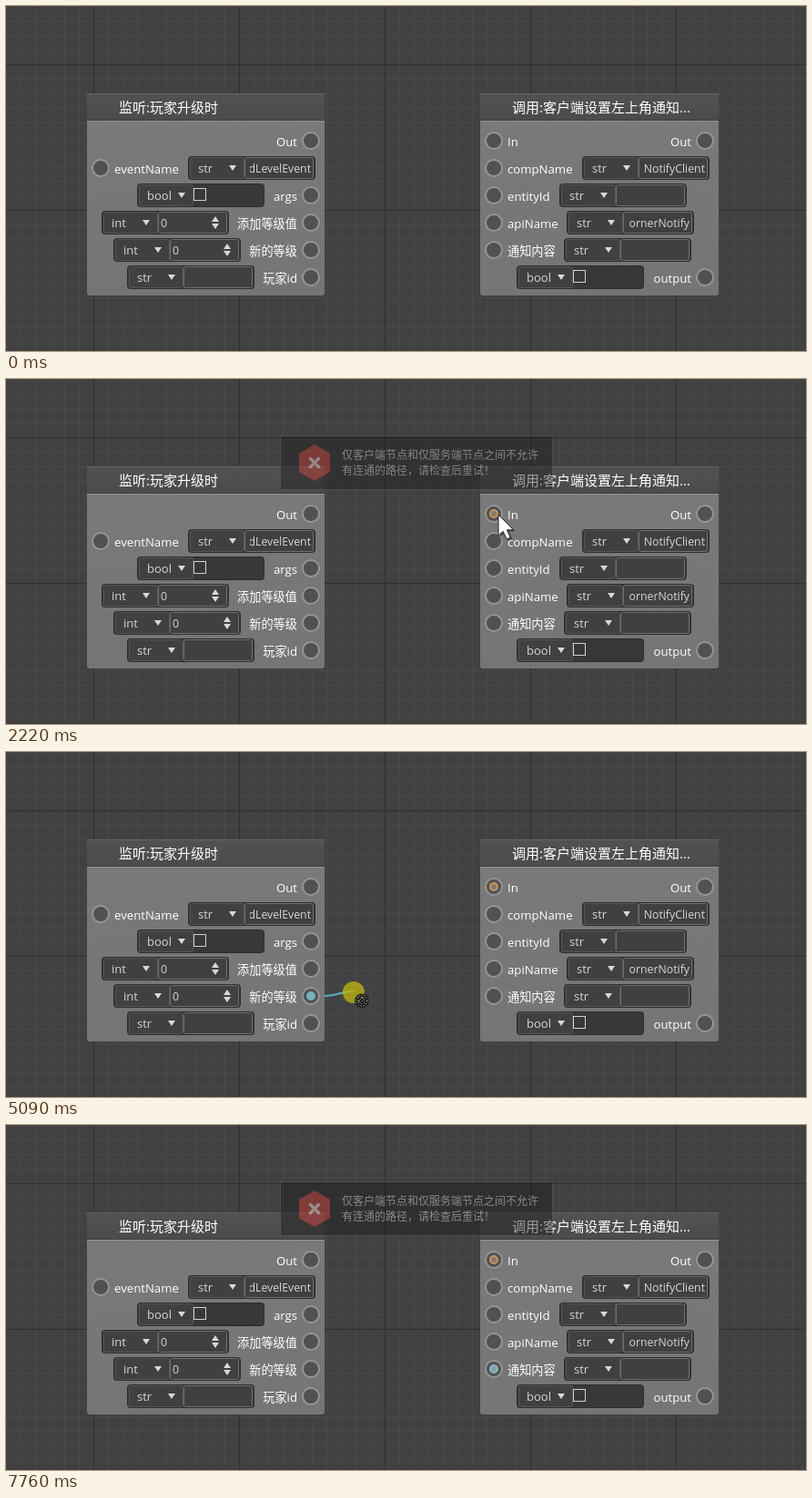
Animation of 879 by 379 pixels, one loop 7.83 s. Source, as an HTML page:

```html
<!DOCTYPE html>
<html lang="zh">
<head>
<meta charset="utf-8">
<title>Node editor</title>
<style>
html, body { margin: 0; width: 100%; height: 100%; overflow: hidden; background: #414141; }
svg { display: block; width: 879px; height: 379px; }
text { font-family: "Open Sans", "Noto Sans CJK SC", "Noto Sans CJK", sans-serif; white-space: pre; }
.title { font-size: 15px; fill: #fff; }
.label { font-size: 13.2px; fill: #fff; }
.type { font-size: 13px; fill: #d6d6d6; }
.value { font-size: 12.3px; fill: #d6d6d6; }
.msg { font-size: 12px; fill: #cfcfcf; }
</style>
</head>
<body>
<svg id="stage" viewBox="0 0 879 379">
  <defs>
    <linearGradient id="body" x1="0" y1="0" x2="0" y2="1">
      <stop offset="0" stop-color="#7a7a7a"/><stop offset="1" stop-color="#757575"/>
    </linearGradient>
    <linearGradient id="head" x1="0" y1="0" x2="0" y2="1">
      <stop offset="0" stop-color="#525252"/><stop offset="1" stop-color="#4b4b4b"/>
    </linearGradient>
  </defs>
  <rect width="879" height="379" fill="#414141"/>
  <path id="fine" stroke="#494949" fill="none"/>
  <path id="coarse" stroke="#2f2f2f" fill="none"/>
  <g id="nodes"></g>
  <g id="dots"></g>
  <path id="cable" fill="none" stroke-width="2"/>
  <g id="toast">
    <rect x="301.5" y="62.5" width="299" height="59" fill="#1b1b1b" fill-opacity=".88" stroke="#595959"/>
    <path d="M339 72l17 9.8v20.4l-17 9.8l-17-9.8v-20.4z" fill="#c2352f"/>
    <path d="M333.5 86.5l11 11m0-11l-11 11" stroke="#e9dcd8" stroke-width="3.2"/>
    <text class="msg" x="369" y="88">仅客户端节点和仅服务端节点之间不允许</text>
    <text class="msg" x="369" y="105">有连通的路径，请检查后重试！</text>
  </g>
  <g id="pointer">
    <path d="M2 2v23l5-4.5l4 8.5l4.5-2l-4-8.5h7z" fill="#000" opacity=".35"/>
    <path d="M0 0V23L5.2 18.4L9.2 27L13.3 25.2L9.4 16.8H16.6Z" fill="#fff" stroke="#222"/>
  </g>
  <g id="grab">
    <circle r="12" fill="#c9bf0a" fill-opacity=".7"/>
    <g id="allow">
      <path d="M1 0V16.2L4.6 12.9L7.2 19L10 17.8L7.4 11.8H12.4Z" fill="#fff" stroke="#222"/>
      <rect x="11.5" y="20.5" width="8" height="8" fill="#fff" stroke="#111"/>
      <path d="M13 24.5h5m-2.5-2.5v5" stroke="#111" stroke-width="1.4"/>
    </g>
    <g id="deny" fill="none">
      <circle cx="9" cy="9" r="6" stroke="#111" stroke-width="3.4"/>
      <path d="M5 5l8 8" stroke="#111" stroke-width="3.4"/>
      <circle cx="9" cy="9" r="6" stroke="#ccc" stroke-dasharray="1.5 1.5"/>
      <path d="M5 5l8 8" stroke="#ccc" stroke-dasharray="1.5 1.5"/>
    </g>
  </g>
</svg>
<script>
const LOOP = 7830, STEP = 70;
const $ = id => document.getElementById(id);

function add(parent, tag, attrs, text) {
  const el = document.createElementNS("http://www.w3.org/2000/svg", tag);
  for (const k in attrs) el.setAttribute(k, attrs[k]);
  if (text !== undefined) el.textContent = text;
  parent.append(el);
  return el;
}
const nodes = $("nodes");
const rect = (x, y, width, height, fill, stroke = "none", rx = 0) =>
  add(nodes, "rect", { x, y, width, height, fill, stroke, rx });
const write = (cls, x, y, text, anchor = "start") =>
  add(nodes, "text", { class: cls, x, y, "text-anchor": anchor }, text);
const shape = (d, fill) => add(nodes, "path", { d, fill });

function drawGrid() {
  let fine = "", coarse = "";
  const line = (i, d) => { if (i % 10) fine += d; else coarse += d; };
  for (let i = 0; i < 56; i++) line(i + 4, `M${i * 16 + .5} 0V379`);
  for (let i = 0; i < 24; i++) line(i + 6, `M0 ${i * 16 + .5}H879`);
  $("fine").setAttribute("d", fine);
  $("coarse").setAttribute("d", coarse);
}

function drawFrame(x, w, title, titleX) {
  rect(x, 96, w, 222, "url(#body)", "none", 3);
  shape(`M${x} 126V99q0-3 3-3h${w - 6}q3 0 3 3v27z`, "url(#head)");
  rect(x, 96, w, 1, "#626262", "none", 1);
  rect(x, 125, w, 1, "#3c3c3c");
  rect(x, 126, w, 1, "#959595");
  write("title", titleX, 117, title);
}

function port(x, y) {
  add(nodes, "circle", { cx: x, cy: y, r: 9, fill: "#515151", stroke: "#959595", "stroke-width": 2 });
}

let clips = 0;
function field(x, y, type, value) {
  rect(x + .5, y - 12.5, 139, 25, "#383838", "#2d2d2d", 3);
  rect(x + 2.5, y - 11.5, 59, 23, "#404040", "#565656", 2);
  write("type", x + 11, y + 5, type);
  shape(`M${x + 45} ${y - 3}h8l-4 6z`, "#d8d8d8");
  if (type === "bool") {
    rect(x + 62.5, y - 7.5, 13, 13, "#383838", "#d0d0d0");
    return;
  }
  rect(x + 62.5, y - 11.5, 75, 23, "#404040", "#707070", 2);
  if (type === "int") {
    write("value", x + 65, y + 5, "0");
    shape(`M${x + 121} ${y - 1}h8l-4-6zM${x + 121} ${y + 1}h8l-4 6z`, "#d8d8d8");
  } else if (value) {
    const id = "clip" + clips++;
    const clip = add(nodes, "clipPath", { id });
    add(clip, "rect", { x: x + 68, y: y - 11, width: 69, height: 22 });
    write("value", x + 135, y + 5, value, "end").setAttribute("clip-path", `url(#${id})`);
  }
}

function input(x, y, label, fieldX, type, value) {
  port(x, y);
  write("label", x + 15, y + 6, label);
  if (type) field(fieldX, y, type, value);
}
function output(x, y, label, fieldX, type) {
  port(x, y);
  write("label", x - 15, y + 6, label, "end");
  if (type) field(fieldX, y, type);
}

drawGrid();
drawFrame(89, 261, "监听:玩家升级时", 124);
output(335, 148, "Out");
input(104, 178, "eventName", 200, "str", "dLevelEvent");
output(335, 208, "args", 144, "bool");
output(335, 238, "添加等级值", 105, "int");
output(335, 268, "新的等级", 118, "int");
output(335, 298, "玩家id", 133, "str");

drawFrame(521, 262, "调用:客户端设置左上角通知...", 556);
input(536, 148, "In");
output(768, 148, "Out");
input(536, 178, "compName", 633, "str", "NotifyClient");
input(536, 208, "entityId", 608, "str");
input(536, 238, "apiName", 616, "str", "ornerNotify");
input(536, 268, "通知内容", 613, "str");
output(768, 298, "output", 561, "bool");

// Port highlights: position, look, visible span
const ORANGE = "#f0a04a", TEAL = "#55b3c0", RED = "#d01a16";
const dots = [
  [335, 148, "#cf8a48", "#dd9850", 970, 2080],
  [536, 148, "#8a7a68", "#c8965c", 1660, LOOP],
  [335, 268, "#86aeb4", "#69b4be", 4820, 5930],
  [536, 268, "#7fa3aa", "#82bac6", 5510, LOOP]
].map(([cx, cy, fill, stroke, from, to]) => ({
  el: add($("dots"), "circle", { cx, cy, r: 4, fill, stroke, "stroke-width": 2 }), from, to
}));

// Pointer moves: start, end, from x y, to x y
const moves = [
  [130, 900, 628, 360, 337, 146],
  [970, 1660, 335, 147, 529, 145],
  [1730, 1731, 541, 149, 541, 149],
  [2570, 2780, 541, 149, 447, 271],
  [3040, 3530, 447, 270, 409, 290],
  [3720, 4280, 409, 290, 349, 271],
  [4410, 4620, 349, 271, 336, 266],
  [4820, 5510, 333, 268, 537, 266],
  [5580, 5581, 543, 266, 543, 266],
  [5860, 6420, 543, 266, 470, 384]
];
const drags = [
  { from: 970, drop: 1730, end: 2080, y: 148, color: ORANGE },
  { from: 4820, drop: 5580, end: 5930, y: 268, color: TEAL }
];
const toasts = [[1730, 3720], [5510, 7480]];
const blocks = [0, 130, 1030, 3110, 3790, 4480, 4820, 4880, 7550];

const clamp = v => Math.max(0, Math.min(1, v));
const ease = p => p < .5 ? 4 * p ** 3 : 1 - 4 * (1 - p) ** 3;
const show = (el, on) => el.setAttribute("visibility", on ? "visible" : "hidden");
const place = (el, x, y) => el.setAttribute("transform", `translate(${x.toFixed(2)} ${y.toFixed(2)})`);

// The picture advances in 70 ms steps within each block
function snap(t) {
  const start = blocks.filter(b => b <= t).pop();
  return start + Math.floor((t - start) / STEP) * STEP;
}

function pointerAt(t, lift) {
  const m = moves.filter(v => v[0] <= t).pop();
  if (!m) return null;
  const [from, to, x0, y0, x1, y1] = m;
  const p = ease(clamp((t - from) / (to - from)));
  return { x: x0 + (x1 - x0) * p, y: y0 + (y1 - y0) * p - lift * Math.sin(Math.PI * p) };
}

function drawToast(t) {
  const span = toasts.find(([from, out]) => t > from && t < out + 560);
  show($("toast"), !!span);
  if (!span) return;
  const age = t - span[0];
  const alpha = Math.min(clamp(age / 1050), clamp(1 - (t - span[1]) / 560));
  const slide = clamp((age - 70) / 420) ** 1.3;
  $("toast").setAttribute("opacity", alpha.toFixed(3));
  place($("toast"), 0, Math.round(39 * (slide - 1)));
}

function render(time) {
  const t = snap(time);
  const drag = drags.find(d => t >= d.from && t < d.end);
  const held = !!drag && t < drag.drop;
  const at = pointerAt(t, held ? 5 : 0);

  show($("pointer"), at && !held);
  show($("grab"), held);
  show($("allow"), held && at.x >= 521);
  show($("deny"), held && at.x < 521);
  if (at) place(held ? $("grab") : $("pointer"), at.x, at.y);

  const cable = $("cable");
  show(cable, drag && at.x > 350);
  if (drag) {
    const mid = (350 + at.x) / 2, y = at.y - (held ? 1 : 0);
    cable.setAttribute("d", `M350 ${drag.y}C${mid} ${drag.y} ${mid} ${y} ${at.x} ${y}`);
    cable.setAttribute("stroke", held ? drag.color : RED);
  }
  for (const d of dots) show(d.el, t >= d.from && t < d.to);
  drawToast(t);
}

const begin = performance.now();
function tick() {
  render((performance.now() - begin) % LOOP);
  requestAnimationFrame(tick);
}
tick();
</script>
</body>
</html>
```
